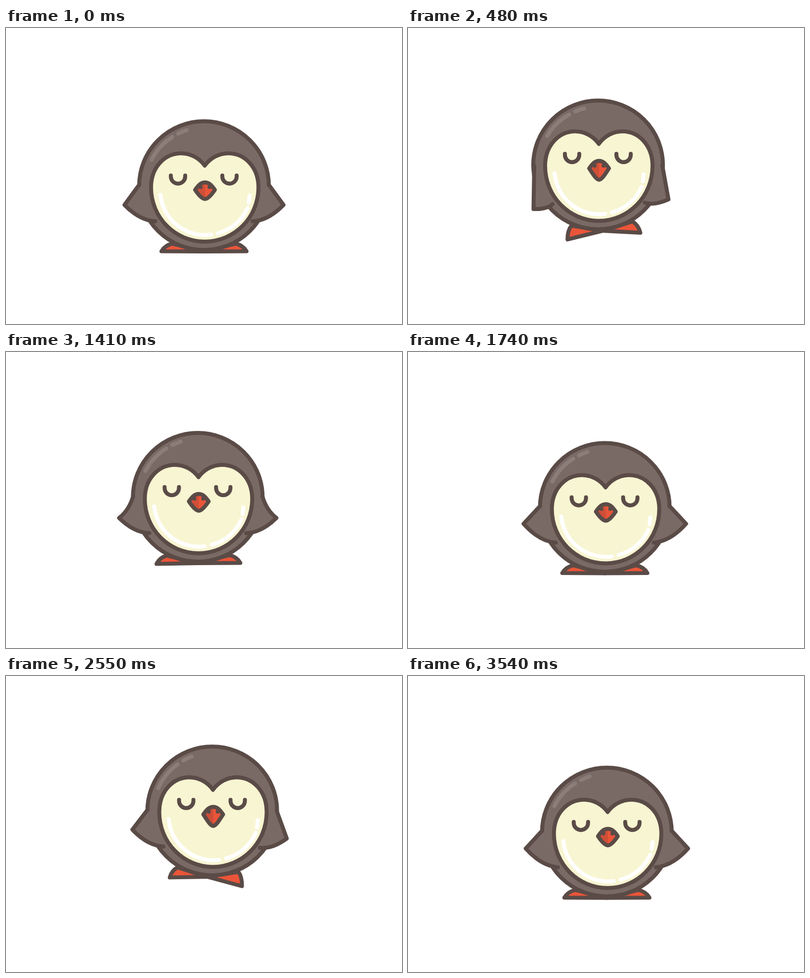
An HTML page for the animation above (3570 ms loop, 800 by 600 pixels).

```html
<!DOCTYPE html>
<html lang="en">
<head>
<meta charset="utf-8">
<title>Hopping penguin</title>
<style>
html, body { margin: 0; width: 100%; height: 100%; overflow: hidden; background: #fff; }
svg { display: block; width: 800px; height: 600px; }
.line { stroke: #5a4b47; stroke-width: 8; stroke-linecap: round; stroke-linejoin: round; }
.coat { fill: #7a6a66; }
.open { fill: none; }
.shine { fill: none; stroke: #fff; stroke-width: 8; stroke-linecap: round; }
.gloss { stroke: #8b7d78; }
</style>
</head>
<body>
<svg viewBox="0 0 800 600">
  <g id="bird">
    <path id="footL" class="line" fill="#ea5539"/>
    <path id="footR" class="line" fill="#ea5539" transform="scale(-1 1)"/>
    <ellipse class="line coat" cy="134.5" rx="131" ry="130.5"/>
    <path id="gloss" class="shine gloss" d="M-106 82A117 117 0 0 1-64 36M-52 29A117 117 0 0 1-35 22"/>
    <g id="wingL"><path class="coat"/><path class="line open"/></g>
    <g id="wingR" transform="scale(-1 1)"><path class="coat"/><path class="line open"/></g>
    <g id="face">
      <path class="line" fill="#f8f5d2" d="M1.5 94C-10 78-28 69-46 69C-80 69-107 98-107 138C-107 199-58.5 248 1.5 248C61.5 248 110 199 110 138C110 98 83 69 49 69C31 69 13 78 1.5 94Z"/>
      <path class="shine" d="M-88 153A91 91 0 0 0 14 234M28 231A91 91 0 0 0 88 180M90.500 169L92 155"/>
      <path class="line open" d="M-67 114v2a14.500 14.500 0 0 0 29 0v-2M37 114v2a14.500 14.500 0 0 0 29 0v-2"/>
      <path id="beak" fill="#ea5539"/>
      <path id="shade" fill="#cf4e37"/>
      <path id="rim" class="line open"/>
      <path class="line open" d="M-7 137.500h.01M11 137.500h.01"/>
    </g>
  </g>
</svg>
<script>
const LOOP = 3570, HALF = LOOP / 2, STEP = 30;
const $ = id => document.getElementById(id);

// Monotone cubic curve through alternating time, value pairs.
function track(...keys) {
  const ts = keys.filter((_, i) => i % 2 === 0);
  const vs = keys.filter((_, i) => i % 2 === 1);
  const last = ts.length - 1;
  const d = ts.slice(1).map((t, i) => (vs[i + 1] - vs[i]) / (t - ts[i]));
  const m = ts.map((_, i) => {
    if (i === 0 || i === last) return 0;
    const a = d[i - 1], b = d[i];
    return a * b > 0 ? 2 * a * b / (a + b) : 0;
  });
  m[0] = (3 * d[0] - m[1]) / 2;
  m[last] = (3 * d[last - 1] - m[last - 1]) / 2;
  return t => {
    let i = 0;
    while (i < last - 1 && t >= ts[i + 1]) i++;
    const w = ts[i + 1] - ts[i], u = (t - ts[i]) / w, v = 1 - u;
    return vs[i] * (1 + 2 * u) * v * v + vs[i + 1] * (3 - 2 * u) * u * u
      + w * u * v * (m[i] * v - m[i + 1] * u);
  };
}

// One hop to the side; the second half of the loop mirrors the first.
const sway = track(0, 0, 255, 13.5, 480, 16, 900, 16.7, 1245, 16.3, 1410, 12.6, 1755, 1.8, HALF, 0);
const lift = track(0, 0, 255, 32, 480, 42, 765, 46, 920, 46.5, 1080, 43, 1245, 36, 1410, 25, 1485, 21, 1755, 3.3, HALF, 0);
const leadWing = track(0, .1, 150, .95, 255, .72, 340, .18, 480, 1, 680, .18, 765, .4,
  870, .95, 1035, .18, 1150, .9, 1245, .63, 1410, .15, 1620, -.03, 1755, 0, HALF, .1);
const trailWing = track(0, .1, 150, .75, 255, .5, 330, .05, 480, .65, 700, .03, 765, .08,
  880, .8, 1035, .05, 1150, .8, 1245, .5, 1410, .15, 1620, -.03, 1755, 0, HALF, .1);
const leadFoot = track(0, 0, 255, .88, 480, .93, 765, 1, 1245, .5, 1410, .1, 1755, 0, HALF, 0);
const trailFoot = track(0, 0, 255, 1, 480, .6, 765, .25, 1000, .3, 1245, .6, 1410, 0, HALF, 0);
const curl = track(0, 0, 1245, 0, 1410, 1, 1600, 0, HALF, 0);

const mix = (a, b, k) => a + (b - a) * k;
const at = (ax, ay, bx, by, k) => [mix(ax, bx, k), mix(ay, by, k)];

function drawWing(id, k, bend) {
  const root = at(-131, 132, -129, 137, k);
  const tip = at(-164, 168, -130.5, 224, k);
  const end = at(-99, 206, -92, 214, k);
  const low = at(-133, 203, -104, 225, k);
  const mid = [(root[0] + tip[0]) / 2 + 6 * bend, (root[1] + tip[1]) / 2 + 6 * bend];
  const d = `M${root}Q${mid} ${tip}Q${low} ${end}`;
  const [fill, edge] = $(id).children;
  fill.setAttribute('d', d + 'L-112 150Z');
  edge.setAttribute('d', d);
}

function drawFoot(id, tip, top, innerX) {
  const bulge = [(tip[0] + top[0]) / 2 - 4, (tip[1] + top[1]) / 2 - 4];
  $(id).setAttribute('d', `M${tip}Q${bulge} ${top}L${innerX} 268Z`);
}

function draw(time) {
  const t = time % HALF;
  const left = time < HALF;
  const side = left ? -1 : 1;
  const [lead, trail] = left ? ['L', 'R'] : ['R', 'L'];
  const f = leadFoot(t), g = trailFoot(t), bend = curl(t);

  $('bird').setAttribute('transform', `translate(${400 + side * sway(t)} ${185 - lift(t)})`);
  $('gloss').setAttribute('transform', `rotate(${-side * 3.5 * f} 0 134)`);
  $('face').setAttribute('transform', `translate(0 245) scale(1 ${1 + .015 * f}) translate(0 -245)`);

  drawWing('wing' + lead, leadWing(t), bend);
  drawWing('wing' + trail, trailWing(t), bend);
  drawFoot('foot' + lead, at(-86, 267.5, -60, 287, f), at(-64, 252, -53, 258, f), 10 * f);
  drawFoot('foot' + trail, at(-86, 267.5, -85, 275, g), at(-64, 252, -70, 249, f), -10 * f);

  const chin = 161.5 + 4.5 * f;
  const half = `M2 128C-6 128-11 133-18 143C-12 152-4 ${chin} 2 ${chin}`;
  const whole = half + `C8 ${chin} 16 152 22 143C15 133 10 128 2 128Z`;
  $('beak').setAttribute('d', whole);
  $('shade').setAttribute('d', half + 'Z');
  $('rim').setAttribute('d', whole);
}

const start = performance.now();
function tick() {
  const time = (performance.now() - start) % LOOP;
  draw(Math.floor(time / STEP) * STEP);
  requestAnimationFrame(tick);
}
tick();
</script>
</body>
</html>
```
